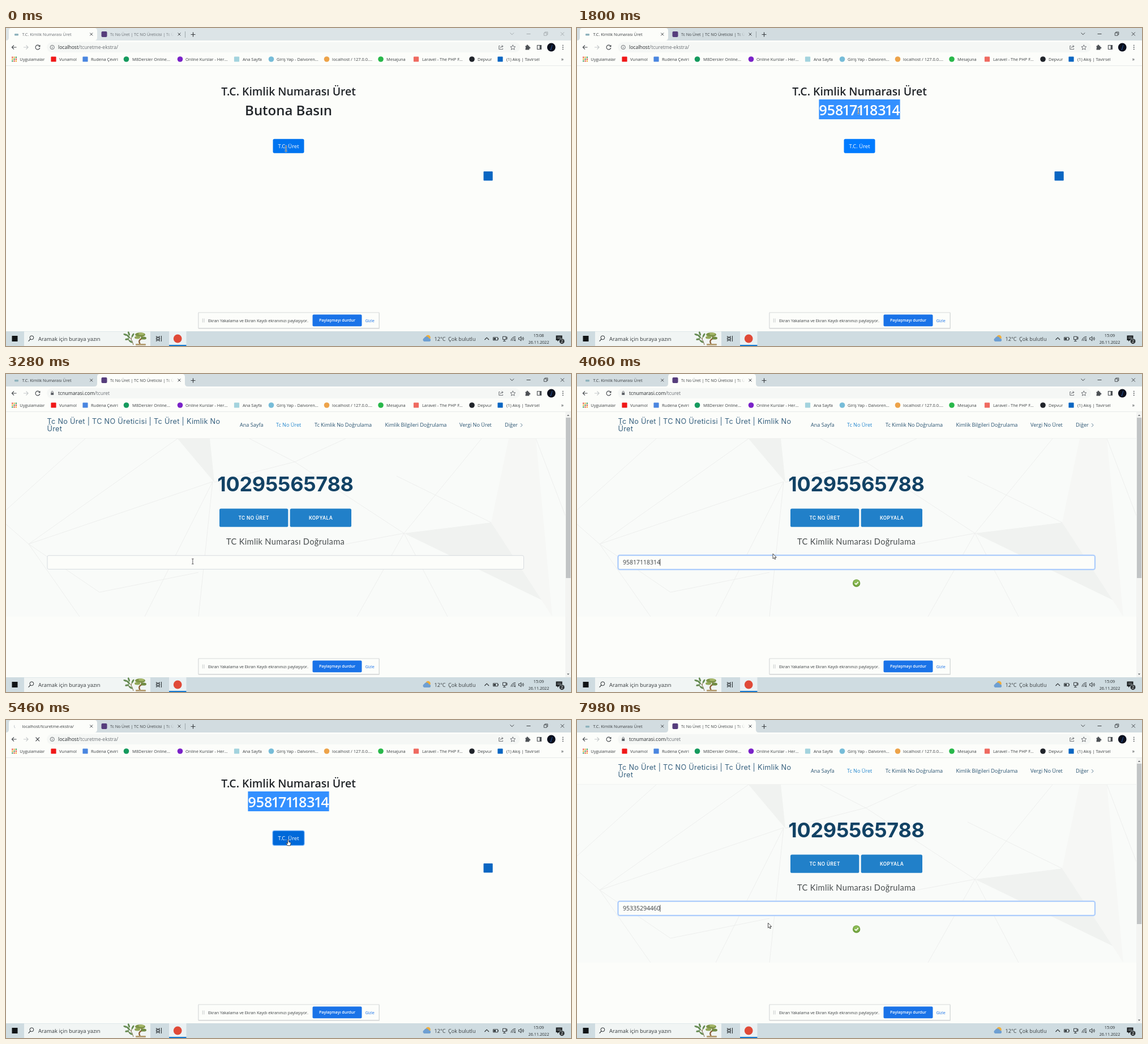
An HTML page for the animation above (8 s loop, 998 px wide and 561 px high).

```html
<!DOCTYPE html>
<html lang="tr">
<head>
<meta charset="utf-8">
<title>T.C. Kimlik Numarası Üret</title>
<style>
html, body { margin: 0; width: 100%; height: 100%; overflow: hidden; background: #fcfdfa; }
svg { display: block; width: 100vw; height: 100vh; font-family: "Open Sans", "Noto Sans", sans-serif; }
text { white-space: pre; }
</style>
</head>
<body>
<svg id="stage" viewBox="0 0 998 561" preserveAspectRatio="none"></svg>
<script>
const LOOP = 8000;
const INK = '#3c4043', NAVY = '#124265', BLUE = '#1a73e8', PAPER = '#fcfdfa', STRIP = '#d2dce0';
const INTER = 'font-family="Inter, sans-serif"';

const text = (x, y, size, str, fill = INK, extra = '') =>
  `<text x="${x}" y="${y}" font-size="${size}" fill="${fill}" ${extra}>${str}</text>`;
const rect = (x, y, w, h, fill, extra = '') =>
  `<rect x="${x}" y="${y}" width="${w}" height="${h}" fill="${fill}" ${extra}/>`;
const dot = (x, y, r, fill, extra = '') => `<circle cx="${x}" cy="${y}" r="${r}" fill="${fill}" ${extra}/>`;
const line = (d, stroke = INK, w = 1, extra = '') =>
  `<path d="${d}" fill="none" stroke="${stroke}" stroke-width="${w}" ${extra}/>`;
const fillPath = (d, fill, extra = '') => `<path d="${d}" fill="${fill}" ${extra}/>`;
const group = (id, body, extra = '') => `<g id="${id}" ${extra}>${body}</g>`;
const cross = (x, y, r, w = 1) =>
  line(`M${x - r} ${y - r}L${x + r} ${y + r}M${x + r} ${y - r}L${x - r} ${y + r}`, '#404448', w);
const tabShape = (x0, x1) =>
  `M${x0 - 5} 22Q${x0} 22 ${x0} 17V5Q${x0} 0 ${x0 + 5} 0H${x1 - 5}Q${x1} 0 ${x1} 5V17Q${x1} 22 ${x1 + 5} 22Z`;

function tabStrip() {
  return rect(0, 0, 998, 22, STRIP, 'id="strip"') +
    fillPath(tabShape(5, 161), PAPER, 'id="tabA"') +
    fillPath(tabShape(161, 316), PAPER, 'id="tabB"') +
    line('M316.5 6V17', '#8f999e', .8, 'id="sep"') +
    group('favicon', rect(15, 10, 7, 3.4, '#8fb3bd', 'rx="1"')) +
    line('M18 7.5A3.5 3.5 0 0 1 21.5 11', '#c2c8cb', 1, 'id="spinner"') +
    group('titles',
      `<text id="tabTitle" x="28.5" y="13.6" font-size="7.4"></text>` +
      text(184, 13.6, 7.1, 'Tc No Üret | TC NO Üreticisi | Tc Üret', 'inherit', 'clip-path="url(#tabClip)" mask="url(#fade)"')
        .replace('fill="inherit"', '')) +
    rect(168.5, 6, 10, 10, '#563d7c', 'rx="2"') +
    cross(150.7, 11, 2.4) + cross(306, 11, 2.4) +
    line('M326.5 11.5H334.5M330.5 7.5V15.5', '#3c4043', 1.2) +
    group('controls',
      line('M890.5 8.5L893.8 11.8L897 8.5') + line('M919.5 10.5H926.5') +
      line('M950.2 8.7H955.2V13.2H950.2ZM951.8 8.5V7H956.8V11.7H955.4', INK, .9) + cross(982.8, 10.5, 3));
}

function toolbar() {
  return rect(0, 22, 998, 45, PAPER) + rect(72, 25, 836, 18, '#f5f7f5', 'rx="9"') +
    line('M18.5 34H10.5M14 30.4L10.4 34L14 37.6', '#4a4e52', 1.2) +
    line('M31 34H39M35.5 30.4L39.1 34L35.5 37.6', '#c3c7c9', 1.1) +
    group('reload', line('M59.3 32A3.9 3.9 0 1 0 59.8 35', '#4a4e52', 1.2) + fillPath('M60.5 29.7V33.3H56.9Z', '#4a4e52')) +
    group('stop', cross(55.8, 34, 3.3, 1.2)) +
    group('info', dot(81.7, 34, 3.6, 'none', 'stroke="#5f6368" stroke-width=".9"') + line('M81.7 33.6V36M81.7 31.8V32.6', '#5f6368', .9)) +
    group('lock', rect(79.2, 33, 5, 4, '#5f6368', 'rx=".6"') + line('M80.2 33.2V31.8A1.5 1.5 0 0 1 83.2 31.8V33.2', '#5f6368', .9)) +
    `<text id="url" x="92" y="37" font-size="8.6" fill="#6a6f74"></text>` +
    line('M872.5 31.5H870.8V37.6H877.5V36M872.8 35.4Q873.5 32.5 877 32.3M875.5 30.4L878.2 32.3L875.5 34.2', '#5f6368', .9) +
    line('M895.3 29.8L896.6 32.7L899.7 33L897.4 35.1L898.1 38.2L895.3 36.6L892.5 38.2L893.2 35.1L890.9 33L894 32.7Z', '#5f6368', .9) +
    fillPath('M917.5 31.5H919.6A1.4 1.4 0 1 1 922.2 31.5H924.3V33.7A1.4 1.4 0 1 1 924.3 36.2V38.4H917.5V36A1.4 1.4 0 0 0 917.5 33.6Z', '#4c5054') +
    line('M938.4 30.5H945.4V37.5H938.4Z', '#4c5054', 1.1) + rect(942.6, 30.5, 3, 7, '#4c5054') +
    dot(963.2, 34, 7.4, '#0b0f1c') + fillPath('M961 39L964.5 29.5L965.5 30L963 39Z', '#1e3f75') +
    [30.6, 34, 37.4].map(y => dot(983.7, y, .95, '#4c5054')).join('');
}

function bookmarks() {
  const colours = ['#e8453c', '#f0a52a', '#3b9b58'];
  let out = '';
  for (let i = 0; i < 9; i++)
    out += rect(10.2 + i % 3 * 3.3, 50.6 + Math.floor(i / 3) * 3.3, 2.2, 2.2, colours[(i + Math.floor(i / 3)) % 3]);
  // label x, label, icon x, icon colour, round icon
  const items = [
    [24.3, 'Uygulamalar'],
    [94, 'Vunamol', 84, '#f01818', 0],
    [150, 'Rudena Çeviri', 140, '#4a86e0', 0],
    [223, 'M8Dersler Online...', 212.5, '#149a5d', 1],
    [317, 'Online Kurslar - Her...', 307.5, '#7a22c8', 1],
    [418, 'Ana Sayfa', 407.5, '#a3d3de', 0],
    [478, 'Giriş Yap - Dalvoren...', 468.5, '#76bcd8', 1],
    [576, 'localhost / 127.0.0....', 566.5, '#eda349', 1],
    [672, 'Mesajuna', 662, '#28b84a', 1],
    [735, 'Laravel - The PHP F...', 724.5, '#ef6a60', 0],
    [833, 'Depvur', 823, '#20242a', 1],
    [884, '(1) Akış | Tavirsel', 873, '#0a66c2', 0]
  ];
  for (const [x, label, ix, colour, round] of items) {
    if (ix) out += round ? dot(ix, 55, 4.8, colour) : rect(ix - 4.6, 50.4, 9.2, 9.2, colour, 'rx="1.2"');
    out += text(x, 57.7, 7.45, label);
  }
  return out + text(980.5, 57.6, 9, '»') + line('M0 66.5H998', '#e4e7e5', .8);
}

function makerPage() {
  return group('maker',
    rect(0, 67, 998, 468, PAPER) +
    text(499, 119, 19.4, 'T.C. Kimlik Numarası Üret', '#212529', 'font-weight="600" text-anchor="middle"') +
    rect(0, 126, 0, 35, '#3390ff', 'id="selection"') +
    `<text id="number" x="499" y="154" text-anchor="middle" font-weight="600"></text>` +
    rect(470.3, 194.5, 57.4, 27.4, '#8ec3ff', 'rx="3.6" id="ring"') +
    rect(471.5, 195.7, 55, 25, '#007bff', 'rx="2.6" id="button"') +
    text(499, 212.3, 9.5, 'T.C. Üret', '#fff', 'text-anchor="middle"') +
    rect(843.5, 253, 16.2, 16.2, '#0a66c2', 'rx="1"'));
}

function checkPage() {
  const nav = [[413, 'Ana Sayfa'], [477, 'Tc No Üret'], [545, 'Tc Kimlik No Doğrulama'],
    [669.5, 'Kimlik Bilgileri Doğrulama'], [801, 'Vergi No Üret'], [881, 'Diğer']];
  const brand = `${INTER} letter-spacing=".3"`;
  const label = `${INTER} font-weight="600" letter-spacing=".42" text-anchor="middle"`;
  return group('check',
    rect(0, 67, 998, 468, PAPER) + rect(0, 114, 988, 314, '#f9fbf9') +
    fillPath('M303 114H360L368 191Z', '#f0f2f0') +
    fillPath('M703 281L857 262L953 402Z', '#f0f2f0') +
    fillPath('M857 262L888 114H936L965 428Z', '#f6f7f5') +
    line('M0 240L140 114M0 265L40 300L303 114M40 300L130 428M40 300L365 190L340 428M40 300L165 385L340 350' +
      'M368 191L510 155L600 114M510 155L430 114M510 155L703 281L620 428M703 281L840 114M703 281L780 428' +
      'M600 300L703 281M936 114L988 250M857 262L690 180M245 428L365 190', '#eceeec', .9) +
    line('M0 113.5H988', '#eff1ef', .8) +
    text(72.5, 87.8, 12.7, 'Tc No Üret | TC NO Üreticisi | Tc Üret | Kimlik No', '#37617f', brand) +
    text(72.5, 100.8, 12.7, 'Üret', '#37617f', brand) +
    nav.map(([x, s], i) => text(x, 93.4, 9.1, s, i == 1 ? '#2487ce' : '#25506f')).join('') +
    line('M909 87.2L912 90.2L909 93.2', '#4b6f88', .9) +
    text(493.5, 207, 36, '10295565788', NAVY, `${INTER} font-weight="700" letter-spacing="-.3" text-anchor="middle"`) +
    rect(377, 237.5, 121.3, 32.3, '#2180c9', 'rx="2.6"') + rect(501.7, 237.5, 108.3, 32.3, '#2180c9', 'rx="2.6"') +
    text(437.6, 256.5, 8.3, 'TC NO ÜRET', '#fff', label) + text(556, 256.5, 8.3, 'KOPYALA', '#fff', label) +
    text(493.6, 300.8, 14.6, 'TC Kimlik Numarası Doğrulama', '#4a4f50',
      'font-family="Lato, sans-serif" letter-spacing=".34" text-anchor="middle"') +
    rect(71.2, 318.4, 845, 27.8, '#bdd6fb', 'rx="4.5" id="glow"') +
    rect(73, 320.2, 841.5, 24.2, PAPER, 'rx="2.6" stroke-width=".8" id="field"') +
    rect(80.5, 326, 66.5, 13, '#3390ff', 'id="fieldSel"') +
    `<text id="value" x="81" y="336.2" font-size="10.5"></text>` +
    line('M0 326.3V338.3', '#222', .8, 'id="caret"') +
    group('tick', dot(493.6, 369, 6.7, '#6f9f3e') + dot(493.6, 368, 5, '#8cbb55') +
      line('M490.7 369L492.9 371.1L496.8 366.9', '#fff', 1.7)) +
    rect(988, 67, 10, 468, '#f3f4f2') + rect(989, 77, 8.2, 283, '#c1c4c5') +
    fillPath('M990.8 74L993 71.5L995.2 74ZM990.8 528.5H995.2L993 531Z', '#6e7274'));
}

function shareBar() {
  return rect(339.5, 502.5, 320.5, 28.6, '#000', 'opacity=".1" rx="1"') +
    rect(340, 502, 319, 27.6, PAPER, 'stroke="#cdd1d3" stroke-width=".8"') +
    line('M347.3 512.5V519.5M350 512.5V519.5', '#c9cccd', 1) +
    text(357, 518.5, 7.27, 'Ekran Yakalama ve Ekran Kaydı ekranınızı paylaşıyor.') +
    rect(541.5, 505.5, 87, 20.7, BLUE, 'rx="2"') +
    text(585, 518.4, 7.1, 'Paylaşmayı durdur', '#fff', 'font-weight="600" text-anchor="middle"') +
    text(634.5, 518.5, 7.25, 'Gizle', BLUE);
}

function bonsai() {
  const leaf = (x, y, rx, ry, c, a = 0) =>
    `<ellipse cx="${x}" cy="${y}" rx="${rx}" ry="${ry}" fill="${c}" transform="rotate(${a} ${x} ${y})"/>`;
  return line('M213 542Q222 546 225 559M218 551L211 548M221 549L224 540', '#7a6844', 1) +
    [[211, 541, 20], [216, 544, 50], [214, 549, -15], [220, 553, 35], [224, 542, -60], [217, 539, 70]]
      .map(([x, y, a]) => leaf(x, y, 3.8, 1.5, '#658b52', a)).join('') +
    line('M237 558Q233 552 238 549T237 541M238 549L244 546', '#8b6039', 2.4) +
    leaf(237, 541, 9, 3.8, '#7d9448') + leaf(232, 546, 5, 2.5, '#93a759') + leaf(243, 547, 5, 2.6, '#708a42') +
    leaf(239, 539.5, 5, 2, '#a6b768') + rect(229, 557, 18, 3, '#b7a177', 'rx="1"');
}

function taskbar() {
  const tray = '#24292c';
  return rect(0, 535, 998, 26, '#cfdce1') + rect(32, 535.5, 223, 25.5, '#f1f5f4') +
    rect(10.5, 543, 10, 10, '#101416') +
    dot(45.4, 546.3, 3.4, 'none', `stroke="${tray}" stroke-width="1"`) + line('M43 548.9L39.6 552.6', tray, 1.1) +
    text(57, 551.5, 9.46, 'Aramak için buraya yazın', '#33383b') + bonsai() +
    line('M265.5 543.5V545H271.5V543.5M265.5 552.8V551.2H271.5V552.8M265.5 546.7H271.5V549.5H265.5ZM274.5 543V553', tray, 1) +
    rect(288, 535, 30.5, 26, '#eaf1f3') + rect(288, 559, 30.5, 2, '#1579cf') + dot(303.2, 548, 7.4, '#e04a38') +
    dot(745.5, 546, 4.3, '#f2ae38') +
    fillPath('M738.5 553A3.2 3.2 0 0 1 738.5 547A4.6 4.6 0 0 1 747 547.4A2.9 2.9 0 0 1 748.3 553Z', '#6e9fd2') +
    text(756.5, 551.5, 9.1, '12°C') + text(781, 551.5, 9.1, 'Çok bulutlu') +
    line('M845.5 550L849.2 546.2L853 550', tray, 1.1) +
    line('M860.5 545.8H868.7V550.8H860.5Z', tray, .9) + rect(861.5, 546.8, 3.6, 3, tray) + rect(869, 547.2, 1, 2.2, tray) +
    line('M877.5 544.3H883.2V549.5H877.5ZM880.3 549.5V552.3M878 552.4H882.7M883.2 546L885 545V549L883.2 548', tray, .9) +
    line('M892 551.8A8 8 0 0 1 900 544.5M894.5 551.8A5.5 5.5 0 0 1 900 547M897 551.8A3 3 0 0 1 900 549.3', tray, .9) +
    dot(899.3, 551.3, .9, tray) +
    line('M905.5 546.6H907.3L909.8 544.2V552L907.3 549.6H905.5ZM911.6 546.4Q913 548.1 911.6 549.8M913.2 545Q915.6 548.1 913.2 551.2', tray, .9) +
    `<text id="clock" x="941" y="544.8" font-size="7.2" fill="${tray}" text-anchor="middle"></text>` +
    text(941, 556.6, 7.2, '26.11.2022', tray, 'text-anchor="middle"') +
    fillPath('M971.5 542.5H982.5V551H976L974 553.3V551H971.5Z', '#15191b') +
    line('M973.5 545.3H980.5M973.5 547.8H980.5', '#dfe7ea', .7) +
    dot(982, 552.7, 4.8, '#2b3033', 'stroke="#cfdce1" stroke-width=".7"') +
    text(982, 555.4, 7.2, '2', '#fff', 'text-anchor="middle"');
}

function pointers() {
  const edge = 'stroke="#222" stroke-width=".8" stroke-linejoin="round"';
  const beam = 'M-1.8 -4.5H1.8M0 -4.5V4.5M-1.8 4.5H1.8';
  return group('arrow', fillPath('M0 0V8.8L2 7L3.4 10L4.8 9.4L3.5 6.5H6.2Z', '#fff', edge)) +
    group('hand', fillPath('M-1 .8Q0 -.7 1 .8V4.3L4 5Q4.8 5.3 4.6 6.4L3.8 10.6H-1.2L-3.4 7Q-3.6 5.8 -2.4 6L-1 7.3Z', '#fff', edge)) +
    group('beam', line(beam, '#fff', 2) + line(beam, '#4b4b4b', .9));
}

document.getElementById('stage').innerHTML =
  `<defs><clipPath id="tabClip"><rect x="184" y="0" width="113" height="22"/></clipPath>
  <linearGradient id="fadeFill" gradientUnits="userSpaceOnUse" x1="282" y1="0" x2="297" y2="0">
  <stop stop-color="#fff"/><stop offset="1" stop-color="#000"/></linearGradient>
  <mask id="fade" maskUnits="userSpaceOnUse" x="184" y="0" width="113" height="22">
  <rect x="184" y="0" width="113" height="22" fill="url(#fadeFill)"/></mask></defs>` +
  tabStrip() + toolbar() + bookmarks() + makerPage() + checkPage() + shareBar() + taskbar() + pointers();

const el = {};
document.querySelectorAll('#stage [id]').forEach(e => el[e.id] = e);
const set = (id, attrs) => { for (const k in attrs) el[id].setAttribute(k, attrs[k]); };
const show = (id, on) => { el[id].style.display = on ? '' : 'none'; };
const write = (id, s) => { if (el[id].textContent !== s) el[id].textContent = s; };
const within = (t, a, b) => t >= a && t < b;

// time, x, y of the pointer's hot spot
const path = [
  [0, 494.5, 213], [250, 493.5, 211], [1350, 493.5, 211], [1680, 497, 146], [2150, 497, 146],
  [2640, 291.5, 0], [2800, 291.5, 0], [3300, 330, 332], [3780, 330, 332], [4000, 346, 317],
  [4150, 346, 317], [4480, 105, 9], [4600, 105, 9], [5150, 498.5, 211], [5700, 498.5, 211],
  [5930, 505, 146], [6200, 505, 146], [6600, 214.5, 2], [6760, 214.5, 2], [7120, 150, 332],
  [7560, 150, 332], [7900, 337.5, 358], [LOOP, 337.5, 358]
];
function pointerAt(t) {
  const i = path.findIndex(p => p[0] > t);
  const [t0, x0, y0] = path[i - 1], [t1, x1, y1] = path[i];
  const u = (t - t0) / (t1 - t0), k = u * u * (3 - 2 * u);
  return [x0 + (x1 - x0) * k, y0 + (y1 - y0) * k];
}

const FIRST = '87057318470', SECOND = '95817118314', THIRD = '95335294460';

function drawNumber(str, selected) {
  const isNumber = /^\d/.test(str), one = c => c === '1' ? 1 : 0;
  // the heading face sets its ones tighter than other digits
  const dx = isNumber ? [...str].map((c, i) => i ? -1.8 * (one(c) + one(str[i - 1])) : 0).join(' ') : '0';
  const w = 157.6 - 3.6 * [...str].filter(c => one(c)).length;
  write('number', str);
  set('number', { dx, 'font-size': isNumber ? 25.1 : 24, fill: selected ? '#fff' : '#212529' });
  set('selection', { x: 499 - w / 2, width: w });
  show('selection', selected);
}

function render(t) {
  const second = within(t, 2760, 4540) || t >= 6680;
  const loading = within(t, 420, 700) || within(t, 960, 1240) || within(t, 5380, 5680);
  const [x, y] = pointerAt(t);

  // the window gains focus shortly after the start
  const active = t >= 250, strip = active ? STRIP : '#dce4e7';
  set('strip', { fill: strip });
  set('titles', { fill: active ? INK : '#6a6f74' });
  set('controls', { opacity: active ? 1 : .35 });
  set('tabA', { fill: second ? strip : PAPER });
  set('tabB', { fill: second ? PAPER : y < 22 && within(x, 161, 316) ? '#e6ecee' : strip });
  show('sep', !second);
  show('favicon', !loading);
  show('spinner', loading);
  set('spinner', { transform: `rotate(${t * .5 % 360} 18 11)` });
  write('tabTitle', loading ? 'localhost/tcuretme-ekstra/' : 'T.C. Kimlik Numarası Üret');
  show('reload', !loading);
  show('stop', loading);
  show('info', !second);
  show('lock', second);
  const [host, rest] = second ? ['tcnumarasi.com', '/tcuret'] : ['localhost', '/tcuretme-ekstra/'];
  if (el.url.textContent !== host + rest) el.url.innerHTML = `<tspan fill="#25292c">${host}</tspan>${rest}`;
  write('clock', t < 500 ? '15:08' : '15:09');

  show('maker', !second);
  show('check', second);
  const number = t < 700 ? 'Butona Basın' : t < 1240 ? FIRST : t < 5680 ? SECOND : THIRD;
  drawNumber(number, within(t, 1800, 5680) || t >= 6030);
  const onButton = !second && within(x, 471, 527) && within(y, 195, 221);
  const hover = onButton ? Math.min(1, .4 + t / 200) : 0;
  show('ring', within(t, 400, 1760) || within(t, 5360, 6000));
  set('button', { fill: `rgb(0 ${Math.round(123 - 18 * hover)} ${Math.round(255 - 38 * hover)})` });

  const focus = within(t, 3380, 4540) || t >= 7200;
  const value = t < 3650 ? '' : t < 7480 ? SECOND : THIRD;
  const marked = within(t, 7260, 7480);
  show('glow', focus);
  set('field', { stroke: focus ? '#86b7fe' : '#ced4da' });
  show('fieldSel', marked);
  write('value', value);
  set('value', { fill: marked ? '#fff' : '#3a3f44' });
  show('caret', focus && !marked);
  set('caret', { transform: `translate(${value ? 146.9 : 81} 0)` });
  show('tick', value !== '');

  const overText = second ? within(x, 73, 915) && within(y, 320, 345) : t < 60 || within(y, 126, 161);
  const kind = overText ? 'beam' : onButton ? 'hand' : 'arrow';
  for (const id of ['arrow', 'hand', 'beam']) show(id, id === kind);
  set(kind, { transform: `translate(${x} ${y})` });
}

const start = performance.now();
function tick() {
  render((performance.now() - start) % LOOP);
  requestAnimationFrame(tick);
}
tick();
</script>
</body>
</html>
```
